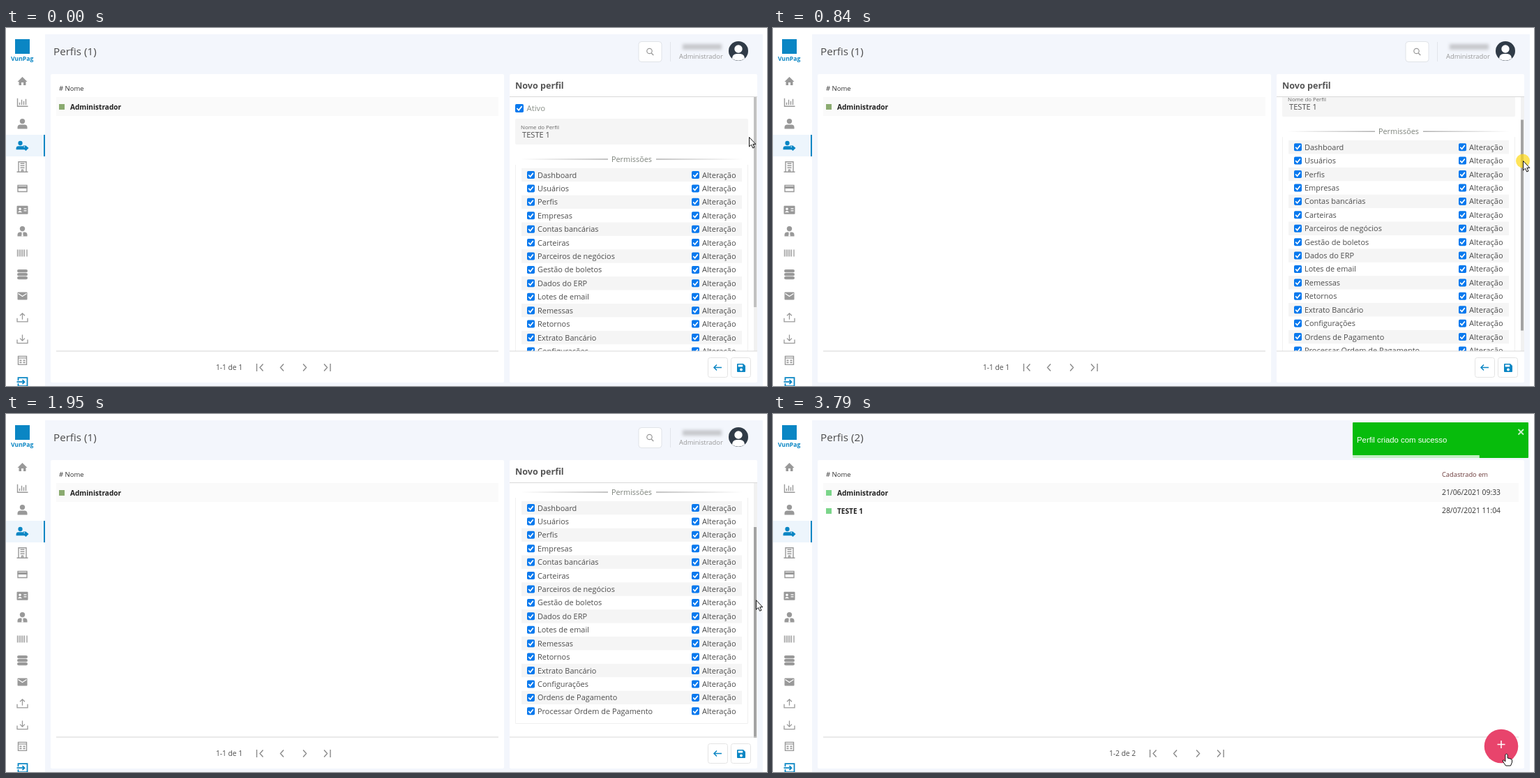
These frames come from a looping animation (1091 by 513 pixels, 3.86 s). An HTML page:

```html
<!DOCTYPE html>
<html lang="pt">
<head>
<meta charset="utf-8">
<title>Perfis</title>
<style>
html, body { margin: 0; width: 100%; height: 100%; overflow: hidden; background: #fff; }
svg { display: block; font-family: "Open Sans", "Noto Sans", sans-serif; }
text { white-space: pre; }
</style>
</head>
<body>
<svg id="stage" width="1091" height="513" viewBox="0 0 1091 513"></svg>
<script>
const BLUE = '#0a86c4', GREY = '#999', TEXT = '#4d4d4d';
const LOOP = 3860, SAVED = 3490;
const MAX_SCROLL = 76, THUMB_TRAVEL = 64;

const rect = (x, y, w, h, fill, more = '') =>
  `<rect x="${x}" y="${y}" width="${w}" height="${h}" fill="${fill}" ${more}/>`;
const text = (x, y, size, str, fill = TEXT, more = '') =>
  `<text x="${x}" y="${y}" font-size="${size}" fill="${fill}" ${more}>${str}</text>`;
const bold = (x, y, size, str, fill) => text(x, y, size, str, fill, 'font-weight="700"');
const fill = (d, color = GREY) => `<path d="${d}" fill="${color}"/>`;
const line = (d, color = GREY, w = 1.4) =>
  `<path d="${d}" fill="none" stroke="${color}" stroke-width="${w}"/>`;
const disc = (x, y, r, color = GREY, more = '') =>
  `<circle cx="${x}" cy="${y}" r="${r}" fill="${color}" ${more}/>`;
const group = (x, y, body, id = '') => `<g id="${id}" transform="translate(${x} ${y})">${body}</g>`;
const plain = (id, body) => `<g id="${id}">${body}</g>`;

const person = color => disc(0, -4, 3.7, color) + fill('M-7 7V5Q-7 1-3 1H3Q7 1 7 5V7Z', color);
const tray = line('M-7.5 1V6H7.5V1', GREY, 1.3);

const icons = [
  fill('M-7 1L0-6 7 1H5V6H1.5V2H-1.5V6H-5V1Z'),
  line('M-7-6V5.5H8M-4 3.5V0M-1 3.5V-4M2 3.5V-2M5 3.5V-5'),
  person(GREY),
  group(-3, 0, `<g transform="scale(.85)">${person(BLUE)}</g>`) +
    fill('M1 0H5L9 3.5 5 7.5 1 4Z', BLUE) + disc(2.8, 1.8, .8, '#fff'),
  line('M-5.5 7V-7.5H5.5V7M-8 7H8M-1 7V4H1V7') +
    line('M-3-5H3M-3-2H3M-3 1H3', GREY, 1.6),
  line('M-6.5-4.5H6.5V4.5H-6.5Z') + rect(-7, -3, 14, 3, GREY),
  rect(-8, -6, 16, 12, GREY, 'rx="1"') + disc(-3.5, -1.5, 1.8, '#fff') +
    fill('M-6.5 3.5Q-3.5-1-.5 3.5Z', '#fff') + line('M2-2H6M2 1H6', '#fff', 1.2),
  person(GREY) + fill('M-1.6 1H1.6L.7 3 1.4 7H-1.4L-.7 3Z', '#fff'),
  line('M-7-5V5M-4.5-5V5M-2-5V5M.5-5V5M3-5V5M6.5-5V5', GREY, 1.3),
  [-5, 0, 5].map(y => rect(-7.5, y - 2.3, 15, 4.4, GREY, 'rx="2.2"')).join(''),
  rect(-7, -5.5, 14, 11, GREY, 'rx="1"') + line('M-6-3.5L0 .5 6-3.5', '#fff', 1.2),
  tray + line('M0 3V-6M-3.5-2.5L0-6 3.5-2.5', GREY, 1.3),
  tray + line('M0-6V2.5M-3.5-1L0 2.5 3.5-1', GREY, 1.3),
  line('M-6-6H6V6H-6ZM-6-3.5H6') + line('M-4 0H-1M1 0H4M-4 3H-1M1 3H4', GREY, 1.6),
  line('M-6-2V-6H7V6H-6V2M-8 0H3M0-3L3 0 0 3', BLUE, 1.8)
];

const sidebar = rect(13, 16, 21, 21, BLUE) + bold(7, 47, 8.6, 'VunPag', BLUE) +
  rect(0, 153, 56, 31, '#edf5fc') + rect(54, 153, 2, 31, BLUE) +
  icons.map((icon, i) => group(23.5, 76 + i * 30.8, icon)).join('');

const header = rect(56, 9, 1029, 504, '#f3f6fc') +
  text(68, 39, 15.2, 'Perfis (<tspan id="count">1</tspan>)') +
  rect(907, 19.5, 33, 29, '#fff', 'rx="4" stroke="#e0e3e8"') +
  `<circle cx="922.5" cy="33" r="3.7" fill="none" stroke="${GREY}" stroke-width="1.2"/>` +
  line('M925.3 36L928.3 39', GREY, 1.3) + rect(952, 20, 1, 28, '#e2e5ea') +
  rect(970, 23, 56, 8, '#c6c8cc', 'style="filter:blur(2px)"') +
  text(965, 44, 9.4, 'Administrador', '#999') +
  disc(1050, 33, 14, '#303b47') + disc(1050, 30, 5.7, '#fff') +
  fill('M1041 44Q1041 38 1047 37H1053Q1059 38 1059 44Q1050 49.5 1041 44Z', '#fff');

const pager = text(301, 490, 10.2, '<tspan id="range">1-1 de 1</tspan>') +
  line('M359.5 481V492M368.5 481.5L364 486.5 368.5 491.5' +
       'M398 481.5L393.5 486.5 398 491.5M426 481.5L430.5 486.5 426 491.5' +
       'M456 481.5L460.5 486.5 456 491.5M465 481V492', '#8a8a8a', 1.4);

const entry = (y, name, color) => rect(76, y - 4, 8, 8, color) + bold(92, y + 4, 10.1, name, '#222');
const listPanel = (w, color) => rect(64, 66, w, 442, '#fff', 'rx="2"') +
  rect(72, 99, w - 16, 27, '#fafafa') + rect(72, 462.5, w - 16, 1, '#d6d6d6') +
  text(76, 90, 9.5, '# Nome', '#333') + entry(113, 'Administrador', color);

const checkbox = (x, y, s) => rect(x, y - s / 2, s, s, '#0879ee', 'rx="1.8"') +
  line(`M${x + s * .2} ${y}L${x + s * .42} ${y + s * .24} ${x + s * .8} ${y - s * .24}`, '#fff', 1.7);

const rows = ['Dashboard', 'Usuários', 'Perfis', 'Empresas', 'Contas bancárias', 'Carteiras',
  'Parceiros de negócios', 'Gestão de boletos', 'Dados do ERP', 'Lotes de email', 'Remessas',
  'Retornos', 'Extrato Bancário', 'Configurações', 'Ordens de Pagamento',
  'Processar Ordem de Pagamento'
].map((name, i) => {
  const y = 210.5 + i * 19.42;
  return (i % 2 ? '' : rect(739, y - 9.7, 316, 19.4, '#f5f5f5')) +
    checkbox(747, y, 11) + text(762, y + 4, 10.95, name) +
    checkbox(983, y, 11) + text(998, y + 4, 11.1, 'Alteração');
}).join('');

const fields = checkbox(730, 115, 12) + text(746.5, 119, 11.4, 'Ativo', '#8b918a') +
  rect(730, 130, 334, 37, '#f5f5f5', 'rx="2"') +
  text(738, 145, 7.85, 'Nome do Perfil', '#666') + text(740, 157, 11.1, 'TESTE 1') +
  line('M730.5 196V519.5H1063.5V196', '#f0f0f0', 1) +
  rect(738, 187.5, 125, 1, 'url(#fadeIn)') + rect(932, 187.5, 124, 1, 'url(#fadeOut)') +
  text(868, 192, 10.85, 'Permissões', '#7c827b') + rows;

const button = (x, id) => rect(x + .5, 472.5, 28, 28, '#fff', `id="${id}" rx="3" stroke="#e4e4e4"`);
const form = rect(722, 66, 355, 442, '#fff', 'rx="2"') +
  bold(730, 87, 12.6, 'Novo perfil', '#555') +
  `<g clip-path="url(#view)">${group(0, 0, fields, 'content')}</g>` +
  rect(1072, 99, 5, 364, '#f1f1f1') + rect(1072, 98, 4, 302, '#c1c1c1', 'id="thumb"') +
  rect(722, 98, 355, 1, '#d9d9d9') + rect(722, 462.5, 355, 1, '#d9d9d9') +
  button(1006, 'back') + line('M1026 486.5H1015.5M1019 482.5L1015 486.5 1019 490.5', BLUE, 1.5) +
  button(1039, 'save') + fill('M1048 482Q1048 481 1049 481H1057L1060 484V492Q1060 493 1059 493H1049Q1048 493 1048 492Z', BLUE) +
  rect(1049.7, 482.5, 6.5, 3, '#fff') + disc(1054, 489.5, 1.9, '#fff');

const saved = listPanel(1013, '#7bd58a') + entry(139, 'TESTE 1', '#7bd58a') +
  text(959, 90, 9.3, 'Cadastrado em', '#6b3a3a') +
  text(959, 116, 10.35, '21/06/2021 09:33', '#333') +
  text(959, 142, 10.35, '28/07/2021 11:04', '#333') +
  disc(1044, 476, 24.3, '#e8446c') + line('M1038.5 473.5H1049.5M1044 468V479', '#fff', 1.5);

const toast = rect(831, 12, 252, 51, '#07bc0c', 'rx="1"') +
  rect(831, 59, 252, 4, '#fff', 'id="progress" opacity=".75"') +
  text(837, 41, 11.35, 'Perfil criado com sucesso', '#fff',
    'font-family="Liberation Sans, Arial, sans-serif"') +
  line('M1068.5 22L1076 29.5M1076 22L1068.5 29.5', '#c9f0ca', 1.8);

const pointer = (id, d) => `<path id="${id}" d="${d}" fill="#fff" stroke="#111" stroke-width="1"/>`;
const fade = (id, a, b) => `<linearGradient id="${id}"><stop stop-color="#888" stop-opacity="${a}"/>` +
  `<stop offset="1" stop-color="#888" stop-opacity="${b}"/></linearGradient>`;

const $ = id => document.getElementById(id);
$('stage').innerHTML =
  `<defs>${fade('fadeIn', 0, 1)}${fade('fadeOut', 1, 0)}<clipPath id="view">${rect(722, 99, 355, 364, '#000')}</clipPath></defs>` +
  rect(0, 0, 1091, 513, '#fff') + header + sidebar +
  plain('editing', listPanel(650, '#8bab70') + form) +
  plain('done', saved) + group(0, 0, pager, 'pager') + group(0, 0, toast, 'toast') +
  group(0, 0, disc(0, .5, 10, '#ffd91a', 'id="press" opacity=".72"') +
    pointer('arrow', 'M.5 .5V14L3.5 11.2 5.7 16 8 15 5.8 10.4H9.8Z') +
    pointer('hand', 'M-1.6 1.2Q0-1 1.6 1.2V6L5.5 7Q8 7.5 8 9V12L6 17H-1L-5 11Q-6 8.5-4 9L-1.6 11Z'), 'cursor');

// Keys are [time, value, ...]; values run straight between them.
const scrollKeys = [[420, 0], [490, 3], [560, 7.4], [840, 39.8], [1050, 69], [1120, MAX_SCROLL]];
const cursorKeys = [[0, 1065, 156], [280, 1075, 154], [420, 1075, 154], [560, 1075, 160],
  [840, 1075, 190], [1050, 1075, 221], [1170, 1075, 237], [1590, 1075, 266], [1950, 1075, 266],
  [2410, 1047, 384], [2480, 1047, 388], [2960, 1050, 491], [3140, 1051.5, 487]];

function at(keys, t) {
  const i = keys.findIndex(k => k[0] > t);
  if (i === 0) return keys[0].slice(1);
  if (i < 0) return keys[keys.length - 1].slice(1);
  const a = keys[i - 1], b = keys[i], p = (t - a[0]) / (b[0] - a[0]);
  return a.slice(1).map((v, j) => v + (b[j + 1] - v) * p);
}
const move = (id, x, y) => $(id).setAttribute('transform', `translate(${x} ${y})`);
const show = (id, on) => $(id).setAttribute('display', on ? 'inline' : 'none');

function draw(t) {
  // Dragging advances in steps of 70 ms.
  const step = t < 1170 ? Math.floor(t / 70) * 70 : t;
  const [scroll] = at(scrollKeys, step), [x, y] = at(cursorKeys, step);
  const isDone = t >= SAVED, hover = y > 473;

  move('content', 0, -scroll);
  $('thumb').setAttribute('y', 98 + scroll / MAX_SCROLL * THUMB_TRAVEL);
  $('thumb').setAttribute('fill', t < 280 ? '#c1c1c1' : '#a3a3a3');
  $('save').setAttribute('fill', hover ? '#efefef' : '#fff');

  move('cursor', x, y);
  show('press', t >= 420 && t < 1240);
  show('arrow', !hover);
  show('hand', hover);

  show('editing', !isDone);
  show('done', isDone);
  show('toast', isDone);
  move('pager', isDone ? 181 : 0, 0);
  $('count').textContent = isDone ? 2 : 1;
  $('range').textContent = isDone ? '1-2 de 2' : '1-1 de 1';
  if (isDone) {
    const left = Math.max(0, 1 - (t - SAVED) / 210);
    move('toast', 260 * left ** 3, 0);
    $('progress').setAttribute('width', 252 * (1 - (t - SAVED) / 1080));
  }
}

const start = performance.now();
function tick() {
  draw((performance.now() - start) % LOOP);
  requestAnimationFrame(tick);
}
tick();
</script>
</body>
</html>
```
